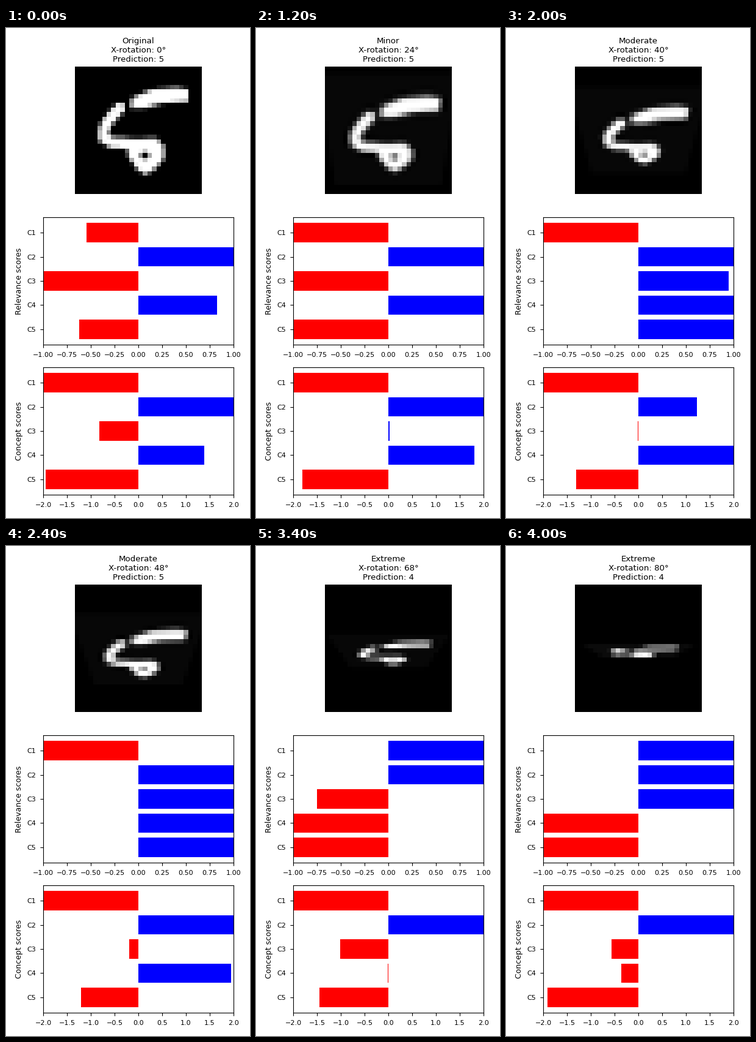
Recreate the animation shown at these times as a matplotlib script. Size 400 by 800 pixels, loop 4100 ms.

```python
import numpy as np
import matplotlib.pyplot as plt
from matplotlib.animation import FuncAnimation
from matplotlib.path import Path

W, H, DPI = 400, 800, 100
FRAMES, INTERVAL, STEP = 41, 100, 2
N, SUB = 28, 8

# Key points of the digit, in pixel units of a 28 x 28 grid
BAR = [(12.3, 9.1), (12.5, 6.9), (17, 5), (22.5, 4.6), (25, 5), (25, 7.7),
       (19, 8.1), (15.5, 9.1)]
HOOK = [(9.9, 9.1), (8.6, 10.5), (7, 12.4), (6.4, 14), (6.4, 15.7),
        (8.2, 16.7), (12, 16.9)]
BELLY = [(11.4, 16), (18, 15.7), (19.7, 17.7), (19.6, 20.2), (18, 22.2),
         (15.7, 23.8), (13.6, 22.5), (11.7, 19.5)]
HOLE = [(15.2, 19.5), (15.7, 19.5)]


def grid(n, sub):
    c = (np.arange(n * sub) + 0.5) / sub
    return np.meshgrid(c, c)


def block_mean(a, sub):
    return a.reshape(N, sub, N, sub).mean(axis=(1, 3))


def area(outline, x, y):
    inside = Path(outline).contains_points(np.c_[x.ravel(), y.ravel()])
    return inside.reshape(x.shape)


def stroke(points, radius, x, y):
    """Mask of all places within the radius of a polyline."""
    mask = np.zeros(x.shape, bool)
    for (ax, ay), (bx, by) in zip(points, points[1:]):
        dx, dy = bx - ax, by - ay
        t = ((x - ax) * dx + (y - ay) * dy) / (dx * dx + dy * dy)
        t = np.clip(t, 0, 1)
        mask |= np.hypot(x - ax - t * dx, y - ay - t * dy) < radius
    return mask


def make_digit():
    x, y = grid(N, SUB)
    ink = area(BAR, x, y) | area(BELLY, x, y) | stroke(HOOK, 1.15, x, y)
    return block_mean(ink & ~stroke(HOLE, 0.7, x, y), SUB)


def cubic(d):
    d = np.abs(d)
    near = 1.5 * d**3 - 2.5 * d**2 + 1
    far = -0.5 * d**3 + 2.5 * d**2 - 4 * d + 2
    return np.where(d < 1, near, np.where(d < 2, far, 0))


def tilt(angle, sub=4):
    """The digit turned about the horizontal axis, seen in perspective."""
    if angle == 0:
        return DIGIT
    s, c = np.sin(np.radians(angle)), np.cos(np.radians(angle))
    depth, slope = 1 + 0.56 * (1 - c), s / (N * np.sqrt(2))
    shift = s * (3.2 * c + 0.8)
    px, py = (g - N / 2 for g in grid(N, sub))
    y = (depth * py - shift) / (c - slope * py)
    x = px * (depth + slope * y)
    taps = np.arange(N) + 0.5 - N / 2
    wx = cubic(x[..., None] - taps)
    wy = cubic(y[..., None] - taps)
    value = ((wy @ DIGIT) * wx).sum(axis=-1) + 0.03
    inside = (np.abs(x) < N / 2) & (np.abs(y) < N / 2)
    out = np.clip(block_mean(np.where(inside, value, 0), sub), 0, 1)
    return out / out.max()


def bump(a, centre, width):
    return np.exp(-((a - centre) / width) ** 2)


# Scores of C1..C5 by angle; whatever passes the limits is cut by the axes
def relevance_scores(a):
    return [-0.545 - 10 * np.sin(np.pi * a / 52),
            1.5 - 3.5 * bump(a, 56, 5),
            0.128 * (a - 32.6) - 5.28 * bump(a, 68, 4),
            0.827 + 0.171 * a - 0.003 * a**2,
            -0.622 - 5 * np.sin(np.pi * a / 31)]


def concept_scores(a):
    start = bump(a, 0, 6)
    fall = 2.6 / (1 + np.exp((a - 59.3) / 5))
    return [-2.3 + 0.4 * bump(a, 14, 5),
            2.2 - 0.24 * bump(a, 14, 5) - 0.97 * bump(a, 40, 6),
            0.03 - 0.85 * start - 1.04 * bump(a, 68, 16),
            fall - 0.4 - 0.39 * bump(a, 24, 5) - 0.815 * start,
            -1.2 - 0.00084 * (a - 51)**2 + 1.435 * start]


def level(angle):
    if angle == 0:
        return 'Original'
    return 'Minor' if angle <= 30 else 'Moderate' if angle <= 60 else 'Extreme'


def px_axes(x, y, w, h):
    return fig.add_axes([x / W, 1 - (y + h) / H, w / W, h / H])


def bar_chart(top, label, limit):
    ax = px_axes(61, top, 312, 208)
    bars = ax.barh(range(5), [limit] * 5, linewidth=0)
    ax.set_yticks(range(5), [f'C{i}' for i in range(1, 6)])
    ax.invert_yaxis()
    ax.set_xlim(-limit, limit)
    ax.set_xticks(np.linspace(-limit, limit, 9))
    ax.tick_params(labelsize=8, pad=4.8)
    fig.text(25.5 / W, 1 - (top + 104) / H, label, size=9, rotation=90,
             ha='center', va='baseline', rotation_mode='anchor')
    return bars


def set_bars(bars, values):
    for bar, v in zip(bars, values):
        bar.set_width(v)
        bar.set_facecolor('blue' if v > 0 else 'red')


DIGIT = make_digit()
plt.rcParams['font.family'] = 'DejaVu Sans'
fig = plt.figure(figsize=(W / DPI, H / DPI), dpi=DPI, facecolor='white')
view = px_axes(113, 63, 208, 208)
view.axis('off')
image = view.imshow(DIGIT, cmap='gray', vmin=0, vmax=1,
                    interpolation='nearest', aspect='auto')
title = view.set_title('', size=9.6)
relevance = bar_chart(309, 'Relevance scores', 1)
concept = bar_chart(554, 'Concept scores', 2)


def draw(frame):
    angle = frame * STEP
    image.set_data(tilt(angle))
    guess = 5 if angle <= 60 else 4
    title.set_text(f'{level(angle)}\nX-rotation: {angle}°\nPrediction: {guess}')
    set_bars(relevance, relevance_scores(angle))
    set_bars(concept, concept_scores(angle))
    return []


anim = FuncAnimation(fig, draw, frames=FRAMES, init_func=lambda: draw(0),
                     interval=INTERVAL, repeat=True, repeat_delay=0)
plt.show()
```
